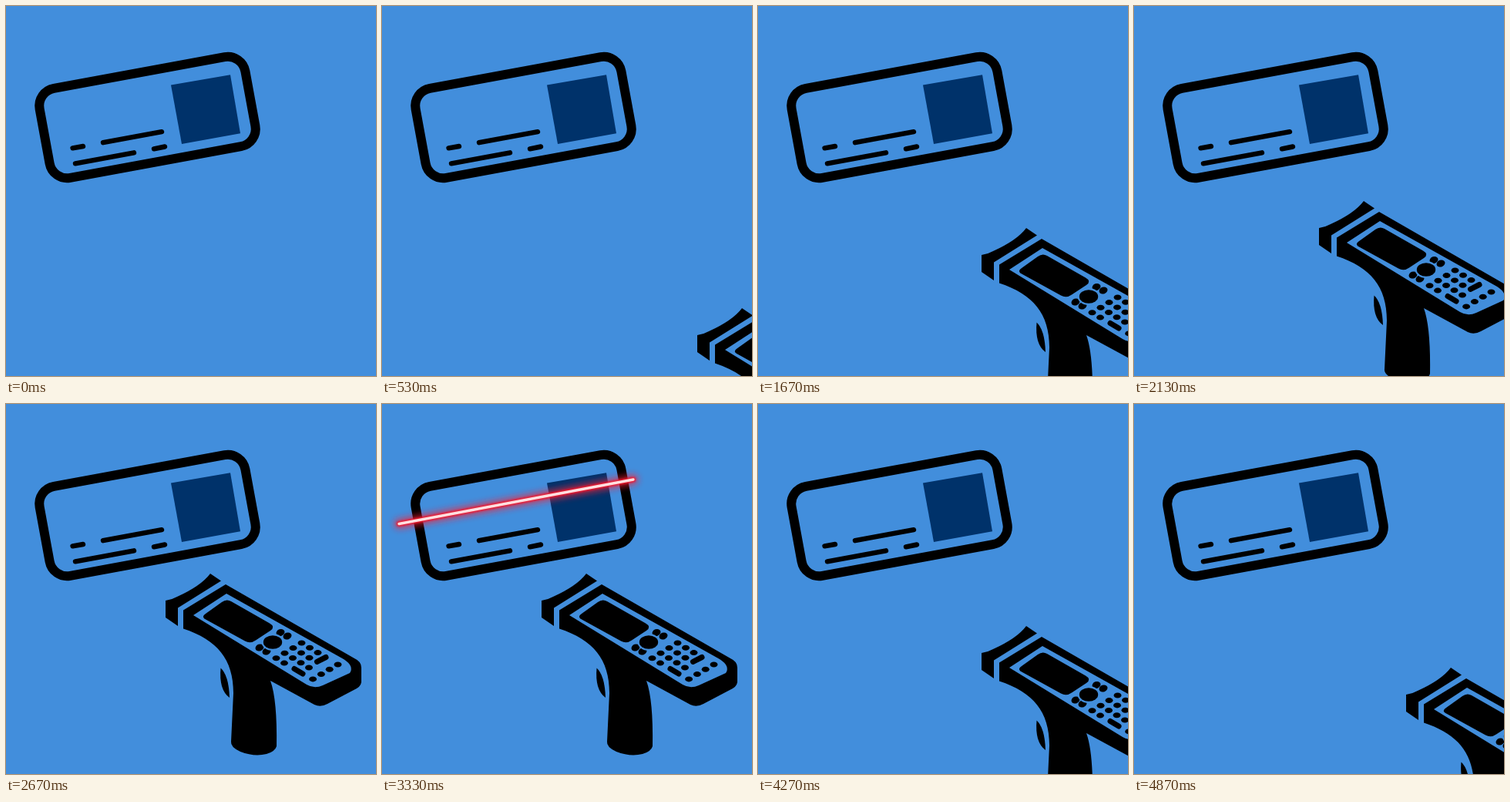
Animation, 480 px wide and 480 px high, one loop 5340 ms. Source, as an HTML page:

```html
<!DOCTYPE html>
<html lang="en">
<head>
<meta charset="utf-8">
<title>Label scan</title>
<style>
html, body { margin: 0; width: 100%; height: 100%; overflow: hidden; background: #428edc; }
svg { display: block; width: 100%; height: 100%; }
.face { fill: #428edc; }
.round { fill: none; stroke: #000; stroke-linecap: round; }
</style>
</head>
<body>
<svg viewBox="0 0 480 480">
  <defs>
    <filter id="wide" filterUnits="userSpaceOnUse" x="-10" y="60" width="380" height="140">
      <feGaussianBlur stdDeviation="4"/>
    </filter>
    <filter id="tight" filterUnits="userSpaceOnUse" x="-10" y="60" width="380" height="140">
      <feGaussianBlur stdDeviation="1.3"/>
    </filter>
  </defs>
  <rect width="480" height="480" fill="#428edc"/>

  <g id="label">
    <rect x="-135.6" y="-59" width="271.2" height="118" rx="23" fill="none" stroke="#000"
      stroke-width="12" transform="translate(183.5 144.5) rotate(-10.4)"/>
    <path class="round" stroke-width="6.4"
      d="M86.5 184.3L100 182M126 177.2L202 163.2M90 204.3L166 190.3M192 185.3L206 182.5"/>
    <path d="M214 102.500L291 89.300L304 165.300L228 179Z" fill="#00326a"/>
  </g>

  <g id="scanner">
    <path d="M207 255Q215 254 222 250Q253 236 265 220L279 229.5L223 264.5V288L207 277Z"/>
    <path d="M230 267.5L285 234L452 330Q461 334 461 342V357Q462 365 455 369L417 389
      Q408 394 400 390L343 359Q352 384 351 444Q349 451 338 454Q322 458 304 451Q291 445 292 438
      L295 375C295 331 274 306 230 291.5Z"/>
    <path d="M278.5 342.5Q289 352 290 381Q276 371 278.5 342.5Z"/>
    <path class="face" d="M243 274L286 246L438 331Q452 340 446 349L411 365Q400 370 390 364Z"/>
    <path d="M259 272L280 257Q286 252.5 292 256L342 284.5Q350 289 343 294L324 306.5
      Q317 311.500 310 307.500L260 280Q252 276.500 259 272Z"/>
    <g id="keys"></g>
    <ellipse cx="346" cy="309" rx="14.5" ry="11" class="face"/>
    <ellipse cx="346" cy="309" rx="12.2" ry="8.8"/>
    <path class="round" stroke-width="7" d="M403.5 334.3L415 328.5M374 343.5L385 350"/>
  </g>

  <g id="laser" fill="none" stroke-linecap="round">
    <path d="M22 155.5L326 98" stroke="#ff1a30" stroke-width="13" opacity=".65" filter="url(#wide)"/>
    <path d="M22 155.5L326 98" stroke="#f0142c" stroke-width="6.5" filter="url(#tight)"/>
    <path d="M22 155.5L326 98" stroke="#ffdfe0" stroke-width="3.4"/>
  </g>
</svg>
<script>
const LOOP = 5340;
const scanner = document.getElementById('scanner');
const laser = document.getElementById('laser');
const keys = document.getElementById('keys');

function addKey(x, y, rx = 5, ry = 3.5, turn = 0) {
  const key = document.createElementNS('http://www.w3.org/2000/svg', 'ellipse');
  const attrs = { cx: x, cy: y, rx, ry, transform: `rotate(${turn} ${x} ${y})` };
  for (const name in attrs) key.setAttribute(name, attrs[name]);
  keys.append(key);
}

for (let col = 0; col < 3; col++) {
  for (let row = 0; row < (col < 2 ? 4 : 3); row++) {
    addKey(383.5 + 10.5 * col - 11 * row, 310 + 6.3 * col + 6.6 * row);
  }
}
for (let i = 0; i < 4; i++) addKey(430.5 - 10.8 * i, 338 + 6.3 * i);
addKey(393, 342);
for (const [x, y] of [[356, 296.5], [365, 301], [329, 316], [338, 321]]) addKey(x, y, 5.6, 4.4, -20);

// Each pose holds until the next start time: [start, dx, dy, laser on]
const AWAY = 400;
const poses = [
  [0, AWAY, AWAY],
  [530, 202, 172],
  [1070, 146, 122],
  [1600, 83, 68],
  [2130, 33, 33],
  [2670, 0, 0],
  [3200, 0, 0, true],
  [3730, 33, 33],
  [4270, 83, 68],
  [4800, 146, 122]
];

function draw(time) {
  const t = time % LOOP;
  const [, dx, dy, lit] = poses.filter(p => p[0] <= t).pop();
  scanner.setAttribute('transform', `translate(${dx} ${dy})`);
  laser.setAttribute('visibility', lit ? 'visible' : 'hidden');
}

const start = performance.now();
function tick() {
  draw(performance.now() - start);
  requestAnimationFrame(tick);
}
tick();
</script>
</body>
</html>
```
